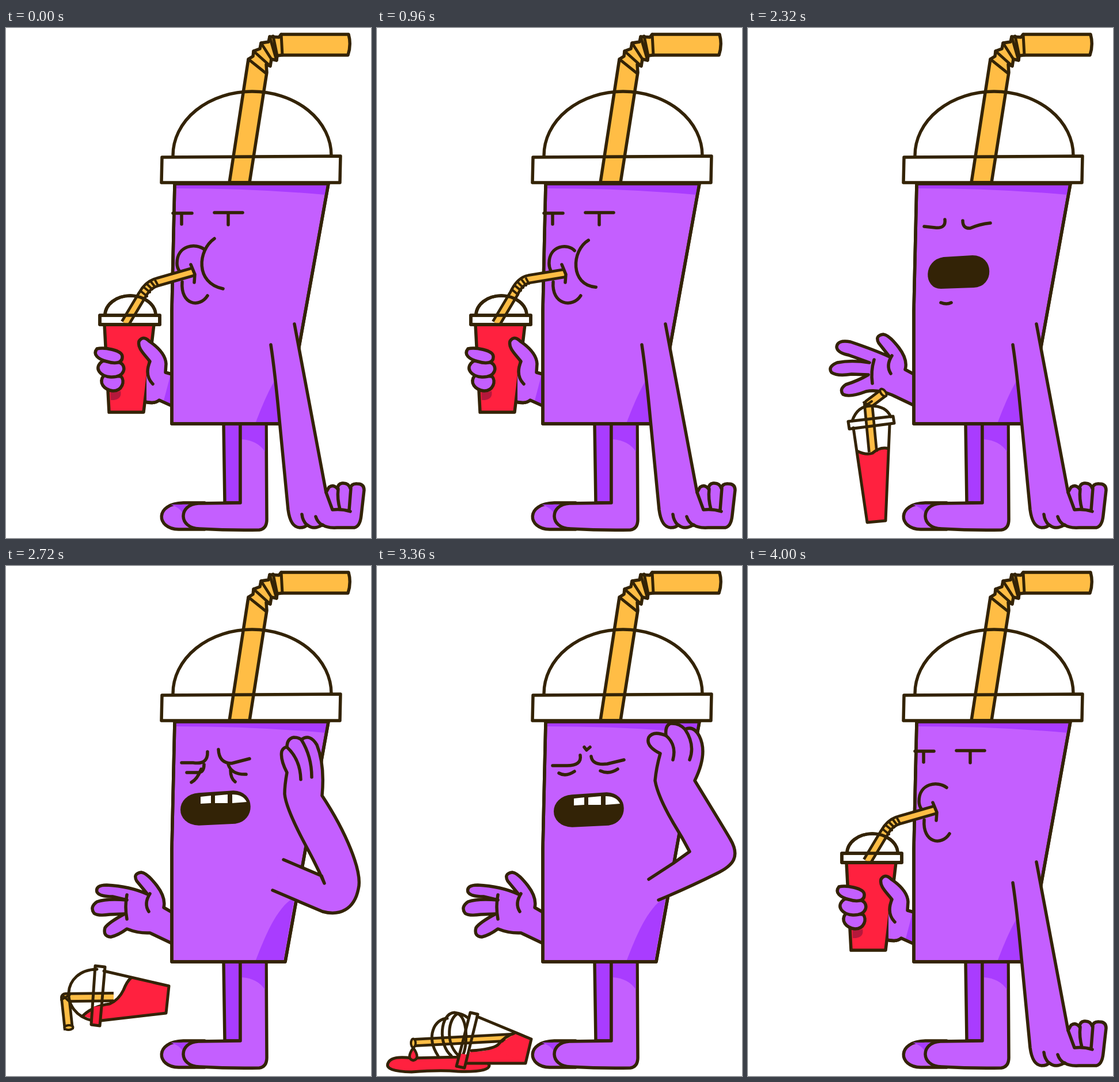
These frames come from a looping animation (634 by 884 pixels, 4.08 s). An HTML page:

```html
<!DOCTYPE html>
<html lang="en">
<head>
<meta charset="utf-8">
<title>Bad sip</title>
<style>
html, body { margin: 0; width: 100%; height: 100%; overflow: hidden; background: #fff; }
svg { display: block; width: 100%; height: 100%; }
</style>
</head>
<body>
<svg id="stage" viewBox="0 0 634 884" stroke-linecap="round" stroke-linejoin="round"></svg>
<script>
const LOOP = 4080, STEP = 80;
const INK = '#332306', SKIN = '#c45fff', SHADE = '#a93cff', GOLD = '#ffbd45', RED = '#ff213f', WHITE = '#fff';

const shape = (d, fill, w = 5.5) => `<path d="${d}" fill="${fill}" stroke="${INK}" stroke-width="${w}"/>`;
const line = (d, w) => shape(d, 'none', w);
const flat = (d, fill) => `<path d="${d}" fill="${fill}"/>`;
const group = (move, body) => `<g transform="${move}">${body}</g>`;
const clamp = x => Math.max(0, Math.min(1, x));
const ramp = (t, a, b) => clamp((t - a) / (b - a));
const smooth = x => x * x * (3 - 2 * x);

// Blend two paths that share the same commands
function mix(a, b, k) {
  const to = b.match(/-?[\d.]+/g);
  let i = 0;
  return a.replace(/-?[\d.]+/g, n => (+n + (to[i++] - n) * k).toFixed(2));
}

function tube(d, w = 18) {
  const stroke = (c, width) => `<path d="${d}" fill="none" stroke="${c}" stroke-width="${width}" stroke-linecap="butt"/>`;
  return stroke(INK, w) + stroke(GOLD, w - 9.5);
}

const tip = (x, y, turn) =>
  `<ellipse cx="${x}" cy="${y}" rx="4" ry="7.5" transform="rotate(${turn} ${x} ${y})" fill="${GOLD}" stroke="${INK}" stroke-width="4"/>`;

const legs =
  shape('M378 686L380 823H407V686Z', SHADE) +
  shape('M345 823L308 823C258 824 260 868 300 869L345 869Z', SKIN) +
  flat('M286 826Q305 832 309 846L328 826Z', SHADE) +
  shape('M407 686V823L334 824C299 826 299 867 336 868Q390 871 440 870Q453 868 453 852L452 686Z', SKIN) +
  flat('M410 688H449.500V734Q437 715 410 713Z', SHADE);

const torso =
  shape('M293 270H560L485 686H288V490Z', SKIN) +
  flat('M296 271H557L554 289Q430 278 296 278Z', SHADE) +
  flat('M434 683C448 648 468 593 501 574L482 683Z', SHADE) +
  line('M293 270H560L485 686H288V490Z');

const hat =
  shape('M388 268L421 54L429 49L430 40L441 36L443 26L456 24L458 15L474 16L478 11H595Q600 29 594 47H479L471 48L470 56L461 54L459 66L452 63L453 77L423 268Z', GOLD) +
  line('M421 54L451 78M430 40L459 66M443 26L461 54M458 15L470 56M464 14L471 48M478 11L480 47', 5) +
  line('M290 221A137.500 111 0 0 1 565 221') +
  line('M271 224L581 222L580 268H270Z');

const armDown =
  shape('M460 549Q467 595 475 680L490 835Q494 865 510 866Q520 866 523 861Q534 871 550 861Q557 867 575 866H605Q615 864 617 845L622 801Q622 790 610 790Q600 789 598 798Q595 788 584 789Q576 790 576 799Q569 790 561 796L556 805L501 513', SKIN) +
  line('M514 843Q515 854 523 862M538 847Q541 857 550 862M556 805L567 835Q583 833 598 838M577 799Q575 816 580 834M599 798L596 836');

const armLow = 'M482 509L548 537L553 550Q540 520 522 487Q486 420 484 395Q484 380 488 358Q476 335 479 321Q482 314 488 314Q488 299 500 297Q508 297 513 301Q528 290 540 310Q554 345 549 398C590 460 620 530 612 560C605 595 580 607 550 599Q505 580 463 562';
const armHigh = 'M472 543L515 515L543 495Q530 470 515 446Q488 400 483 372Q485 350 492 325Q466 312 472 297Q480 285 502 294Q500 276 510 273Q525 272 535 283Q550 276 560 295Q575 325 552 372C580 418 600 450 614 474C632 505 617 520 590 533Q542 557 489 579';
const foldLow = 'M488 314Q511 335 512 370M513 301Q531 330 531 366';
const foldHigh = 'M502 294Q521 310 514 336M535 283Q553 310 543 336';
const armUp = k => shape(mix(armLow, armHigh, k), SKIN) + line(mix(foldLow, foldHigh, k));

const spread = 'M288 600L273 592Q278 575 262 554Q245 532 235 531Q220 533 227 546L246 570Q220 558 178 544Q155 540 154 553Q155 563 175 567L211 580Q180 575 155 580Q138 587 145 597Q155 604 180 600L209 601Q190 612 170 618Q158 626 165 635Q176 641 205 630Q225 626 250 636L290 655';
const limp = 'M288 600L274 592Q278 575 262 554Q245 532 235 531Q220 533 227 546L246 569Q215 555 175 553Q155 553 158 565Q162 573 185 573L210 579Q175 576 158 582Q145 591 153 602Q160 607 180 604L206 603Q178 618 172 627Q168 642 182 643Q195 640 210 629Q230 637 250 636L290 655';
const openHand = k => shape(mix(spread, limp, k), SKIN) +
  line(mix('M250 568Q239 585 248 599M219 575Q213 595 216 616', 'M250 568Q239 585 248 599M210 570Q206 590 210 612', k));

// Cup in the hand, around the given straw
const heldCup = straw =>
  shape('M242 648Q258 652 266 645L290 655V600H240Z', SKIN) +
  shape('M171 514H257L239 666H179Z', RED) +
  flat('M181 628Q195 633 199 629Q202 643 187 645H182Z', '#b5183b') +
  flat('M162 498H267V514H162Z', WHITE) + straw +
  line('M172 498A44 34 0 0 1 260 498') +
  line('M163 498H267V514H163Z') +
  flat('M244 600L288 600V655L266 645L244 646Z', SKIN) +
  flat('M286 600L274 646L286 653Z', SHADE) +
  shape('M255 617Q240 602 250 578C240 565 228 555 231 543Q238 532 249 543Q277 562 278 582L277 597L288 600', SKIN) +
  line('M242 648Q258 652 266 645L288 655') +
  shape('M170 602C160 615 170 627 186 629C202 629 207 612 200 604Z', SKIN) +
  shape('M168 577C150 590 165 604 182 605C207 606 210 586 198 580Z', SKIN) +
  shape('M158 556C170 553 201 558 202 569C203 582 188 582 175 578C160 574 150 566 158 556Z', SKIN);

const sipStraw = k =>
  tube(mix('M207 512L237 462Q247 444 264 440L327 422', 'M207 512L238 460Q248 438 264 435L327 425', k)) +
  group(`translate(0 ${-3 * k})`, line('M234 456L245 465M239 449L250 458M245 444L254 453M252 440L259 449M259 437L264 446', 4));

const bentStraw =
  tube('M223 512L230 440L266 429') +
  line('M223 435L238 446M222 445L238 440M235 432L238 443', 4) + tip(265, 429, 15);

const fallingCup =
  flat('M189 733Q205 741 216 737Q230 725 244 729L239 854L207 857Z', RED) +
  tube('M217 735L209 652L237 631') + tip(235, 632, -38) +
  line('M201 649L216 656M202 656L215 647', 4) +
  line('M181 681Q190 655 213 655Q240 655 248 674M183 693L207 857L239 854L246 688M189 733Q205 741 216 737Q230 725 244 729', 5) +
  line('M174 682L252 673L254 685L176 695Z', 5);

const tumblingCup =
  flat('M217 714L283 728L278 775L160 788L133 780Q150 763 180 759Q196 752 204 735Q210 720 217 714Z', RED) +
  tube('M187 747L103 748L109 804') + line('M96 752L111 743M98 744L110 755', 4) + tip(109, 800, 86) +
  line('M158 699C96 700 92 775 150 788M170 702L283 728L278 775L165 788M217 714Q210 720 204 735Q196 752 180 759Q150 763 133 780', 5) +
  flat('M152 764L167 762L163 797L148 795Z', RED) +
  line('M155 693L172 695L163 797L148 795Z', 5);

function landedCup(t) {
  const grow = .35 + .65 * ramp(t, 2880, 3200);
  const drip = (t - 2880) % 480 / 480 * 10;
  return group(`translate(${150 * (1 - grow)} 0) scale(${grow} 1)`,
      shape('M19 862Q13 876 60 877Q110 873 140 876Q194 878 195 866L188 850L60 853Q24 848 19 862Z', RED, 5)) +
    flat('M106 849C84 815 100 785 122 784L134 774L160 784L174 781L240 808L160 849Z', WHITE) +
    flat('M238 810L268 820L258 862H154L162 842Q200 842 210 830Q222 815 238 810Z', RED) +
    tube('M236 817L66 826', 16) + tip(63, 827, 0) +
    line('M106 849C84 815 100 785 122 784M129 849C105 828 110 776 134 774C158 776 158 825 150 846M140 847C118 825 124 784 140 776M134 774Q150 776 159 784', 5) +
    flat('M240 812L268 820L258 862L210 840Q216 822 240 812Z', RED) +
    line('M174 781L268 820L258 862H156M238 810Q222 815 210 830Q200 838 164 840', 5) +
    flat('M143 845L158 847L152 870L138 867Z', RED) +
    line('M162 774L175 777L152 870L138 867Z', 5) +
    group(`translate(0 ${drip})`, shape('M63 835Q50 854 63 857Q76 854 63 835Z', RED, 4.5));
}

const sipFace = (p, k, cheek) =>
  line('M290 321H323M305 322V340M362 320H411M386 320V341') +
  line(mix('M345 384C330 372 297 376 297 408Q297 415 301 421M306 440C303 480 336 486 350 464',
           'M343 386C332 373 299 376 299 408Q299 415 302 421M306 440C303 480 340 486 354 464', k)) +
  (cheek ? group(`translate(${42 * p} 0)`, line(mix('M362 365C333 385 328 442 377 452', 'M364 368C334 386 332 446 377 449', k))) : '');

const lips = 'M321 410L328 427L327 441';

function shockFace(t) {
  const wide = 1 + .18 * smooth(ramp(t, 1760, 2160));
  return `<g fill="${INK}"><circle cx="314" cy="335.500" r="5.500"/><circle cx="389" cy="335" r="5.500"/></g>` +
    line('M314 381Q297 391 311 407M293 429C290 470 308 476 335 471Q360 468 380 473') +
    group(`translate(353 425) scale(${wide} 1) translate(-353 -425)`,
      shape('M316 432C310 398 388 397 391 432C390 448 370 445 355 443Q335 448 322 443Q317 439 316 432Z', INK));
}

const gagFace =
  line('M306 344L325 346Q344 348 342 332M373 334Q373 348 386 347Q402 340 421 338M335 476Q345 480 353 476') +
  shape('M340 399L390 396C426 396 426 447 392 448L335 450C307 450 306 404 340 399Z', INK, 4);

const squeeze = 'M305 341H325Q351 345 350 322M344 344Q344 358 333 358H314M339 352Q332 370 322 375M369 318Q370 342 392 342L423 334M386 344Q392 362 417 361M390 354Q390 368 398 374';
const regret = 'M305 346H330Q356 346 353 328M316 359Q328 366 343 356M372 330Q374 346 400 343L429 336M388 355Q403 362 418 352M360 314L364 319L370 314';

const groanFace = (t, k) =>
  line(t < 2880 ? squeeze : regret) +
  group(`translate(${4 * k} ${3 * k})`,
    shape('M335 396L395 392C431 393 430 440 398 444L335 447C296 446 296 399 335 396Z', INK) +
    flat('M338 400L356 398V411L338 412ZM363 398L385 396V411H363ZM393 396Q412 396 418 409L393 411Z', WHITE));

function cup(t) {
  if (t < 2480) {
    const left = 1 - ramp(t, 2160, 2320);
    const fall = t < 2400 ? -190 * (1 - (1 - left) ** 1.57) : 17;
    return group(`translate(0 ${fall})`, fallingCup);
  }
  if (t < 2880) {
    const late = t - 2720, y = -8 + .00125 * (t - 2640) ** 2;
    return group(`translate(${-.12 * Math.max(0, late)} ${y}) rotate(${-.35 * late} 195 745)`, tumblingCup);
  }
  return landedCup(t);
}

// How far the hand has slid up the forehead
function rub(t) {
  if (t < 2720) return 1 - smooth(ramp(t, 2560, 2720));
  if (t < 3040) return smooth(ramp(t, 2720, 3040));
  return 1 - .15 * Math.sin(Math.PI * (t - 3040) / 320) ** 2;
}

// The sipping straw crosses the body, so it goes on top with the lid lines
const heldStraw = k => sipStraw(k) +
  line('M172 498A44 34 0 0 1 260 498M163 498H267V514H163Z') + line(lips);

function scene(t) {
  if (t < 1520 || t >= 3840) {
    const again = t >= 3840;
    const p = again ? 0 : (1 - Math.cos(2 * Math.PI * t / 880)) / 2;
    const k = clamp(p * 12);
    return legs + heldCup('') + torso + hat + sipFace(p, again && t < 4000 ? 1 : k, !again) +
      heldStraw(k) + armDown;
  }
  if (t < 2160) return legs + heldCup(bentStraw) + torso + hat + shockFace(t) + armDown;
  const up = t >= 2480, k = up ? rub(t) : 0;
  const face = t < 2320 ? shockFace(t) : up ? groanFace(t, k) : gagFace;
  return legs + openHand(up ? 1 : 0) + torso + hat + face + (up ? armUp(k) : armDown) + cup(t);
}

const stage = document.getElementById('stage');
let shown = -1;

function tick(now) {
  const t = Math.floor(now % LOOP / STEP) * STEP;
  if (t !== shown) stage.innerHTML = scene(shown = t);
  requestAnimationFrame(tick);
}
tick(performance.now());
</script>
</body>
</html>
```
